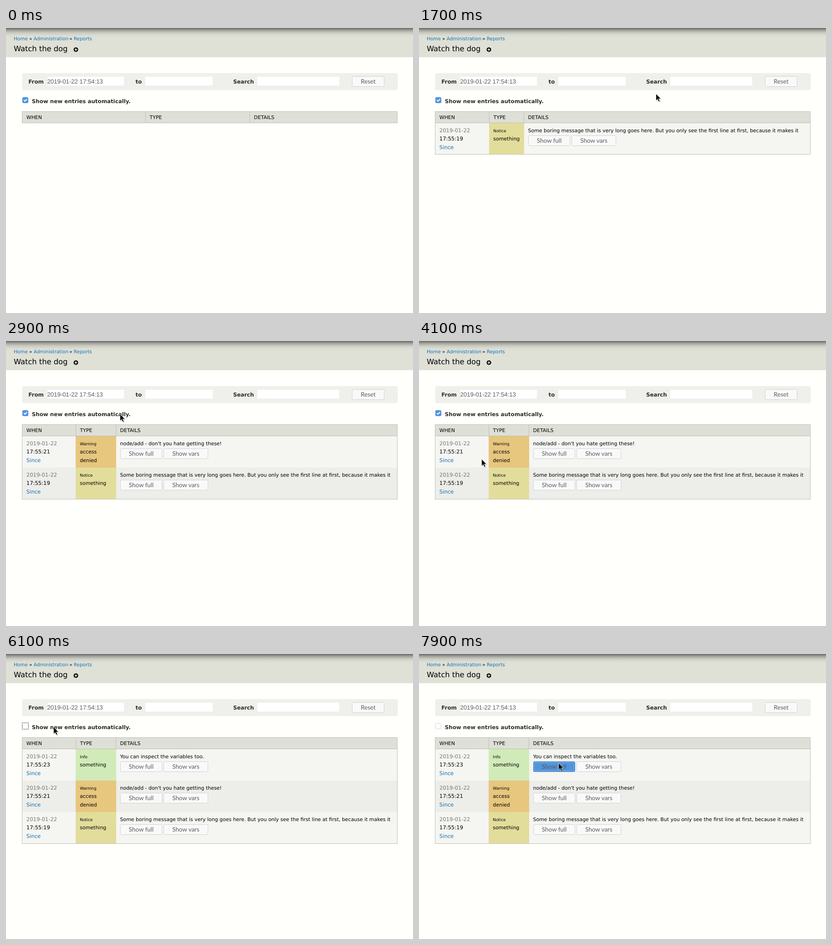
An HTML page for the animation above (8 s loop, 894 px wide and 626 px high).

```html
<!DOCTYPE html>
<html lang="en">
<head>
<meta charset="utf-8">
<title>Watch the dog</title>
<style>
  html, body { margin: 0; width: 100%; height: 100%; overflow: hidden; background: #fffffb; }
  svg { display: block; width: 894px; height: 626px; }
  text { font-family: "DejaVu Sans", sans-serif; font-size: 10.96px; text-rendering: geometricPrecision; white-space: pre; }
  .title { font-size: 16.3px; }
  .crumb { font-size: 10.45px; }
  .label { font-size: 11.83px; font-weight: bold; fill: #2b2b2b; }
  .input { font: 13.2px "Liberation Sans", sans-serif; fill: #595965; }
  .button { font: 13.4px Lato, sans-serif; fill: #5a5a66; text-anchor: middle; }
  .when { font-size: 11.6px; }
  .level { font-size: 8.8px; }
  .link { fill: #0f74b4; }
  .muted { fill: #777; }
</style>
</head>
<body>
<svg viewBox="0 0 894 626">
  <defs>
    <linearGradient id="shade" x2="0" y2="1">
      <stop offset="0" stop-opacity=".53"/>
      <stop offset=".25" stop-opacity=".28"/>
      <stop offset=".5" stop-opacity=".11"/>
      <stop offset=".75" stop-opacity=".03"/>
      <stop offset="1" stop-opacity="0"/>
    </linearGradient>
  </defs>
  <g id="page"></g>
  <g id="table"></g>
  <g id="checkbox"></g>
  <g id="pointer">
    <path d="M1.5 1v15.5l3.7-3.3 2.6 5.5 3-1.4-2.6-5.2h5z" opacity=".18"/>
    <path d="M.5-.5v15l3.4-3.2 2.5 5.4 2.6-1.2-2.5-5.2h4.7z" fill="#0a0a0a" stroke="#f4f4f4" stroke-width=".8"/>
  </g>
</svg>
<script>
const LOOP = 8000, STEP = 200, OFFSET = 100;
const UNCHECK_AT = 6100, PRESS_AT = 7900;
const LEFT = 35.5, RIGHT = 859.5, HEAD_TOP = 183.5, HEAD_BOTTOM = 208.5, ROW = 69.2;

const entries = [
  { at: 500, time: '17:55:19', level: 'Notice', color: '#e3dd9c', type: ['something'],
    text: 'Some boring message that is very long goes here. But you only see the first line at first, because it makes it' },
  { at: 2900, time: '17:55:21', level: 'Warning', color: '#e7c67e', type: ['access', 'denied'],
    text: "node/add - don't you hate getting these!" },
  { at: 4900, time: '17:55:23', level: 'Info', color: '#d1ebb8', type: ['something'],
    text: 'You can inspect the variables too.' }
];

// Separators before the type and details columns, by number of rows
const columns = [[306, 535], [154, 230], [153, 241], [153, 241]];

// Pointer path: time, x, y
const path = [
  [1100, 820, 64], [1300, 745, 88], [1700, 520, 145], [2100, 363, 177],
  [2300, 340, 176], [2700, 304, 171], [2900, 250, 161], [3100, 201, 180], [3300, 201, 180],
  [3500, 188, 215], [3700, 158, 270], [3900, 127, 287], [4100, 137, 260], [4500, 137, 215],
  [4900, 136, 161], [5700, 104, 161], [6300, 104, 161], [6500, 122, 168],
  [7100, 340, 247], [7300, 366, 254], [7500, 349, 254], [7700, 322, 246], [7900, 306, 240]
];

const byId = id => document.getElementById(id);
const text = (x, y, content, style = '') => `<text x="${x}" y="${y}" class="${style}">${content}</text>`;
const rect = (x, y, w, h, fill, extra = '') =>
  `<rect x="${x}" y="${y}" width="${w}" height="${h}" fill="${fill}" ${extra}/>`;
const line = (x1, y1, x2, y2) => `<path d="M${x1} ${y1}L${x2} ${y2}" stroke="#bebfb9"/>`;

function button(x, y, w, label, pressed) {
  const colors = pressed ? ['#5294da', '#4381c6'] : ['#f9faf8', '#cfd2da'];
  const focus = pressed
    ? rect(x + 2, y + 2, w - 4, 18, 'none', 'stroke="#a9c8e9" stroke-dasharray="1 1"') : '';
  return rect(x, y, w, 22, colors[0], `rx="2" stroke="${colors[1]}"`) + focus +
    text(x + w / 2, y + 15.6, label, 'button');
}

function drawPage() {
  byId('page').innerHTML =
    rect(0, 0, 894, 626, '#fffffb') + rect(0, 0, 894, 64, '#dfe0d6') + rect(0, 0, 894, 20, 'url(#shade)') +
    text(17, 27, 'Home', 'crumb link') + text(51, 27, '»', 'crumb') +
    text(60.7, 27, 'Administration', 'crumb link') + text(139.3, 27, '»', 'crumb') +
    text(148.7, 27, 'Reports', 'crumb link') +
    text(17, 51, 'Watch the dog', 'title') +
    '<circle cx="153.5" cy="47.5" r="5"/><path d="M150.5 47.5h6m-3-3v6" stroke="#fff" stroke-width="1.6"/>' +
    rect(35.5, 99, 825, 37.5, '#efefec', 'rx="4"') +
    rect(91, 107, 168, 19.5, '#fff') + rect(306, 107, 148, 19.5, '#fff') + rect(552, 107, 180, 19.5, '#fff') +
    text(49.3, 122, 'From', 'label') + text(284.5, 122, 'to', 'label') + text(499, 122, 'Search', 'label') +
    text(90.5, 122, '2019-01-22 17:54:13', 'input') +
    button(760.5, 106.5, 70, 'Reset') +
    text(56.7, 165.2, 'Show new entries automatically.', 'label');
}

const rowTop = index => Math.round(HEAD_BOTTOM + index * ROW);

function drawRow(entry, index, [typeX, detailsX], pressed) {
  const top = rowTop(index), height = rowTop(index + 1) - top;
  const y = HEAD_BOTTOM + index * ROW, base = Math.round(y + 20);
  const buttonTop = Math.round(y + 27.5) + .5;
  return rect(LEFT, top, RIGHT - LEFT, height, index % 2 ? '#ededea' : '#f5f5f2') +
    rect(typeX, top, detailsX + 1 - typeX, height, entry.color) +
    text(44.8, base, '2019-01-22', 'when muted') +
    text(44.8, base + 18.3, entry.time, 'when') +
    text(44.8, base + 36.5, 'Since', 'when link') +
    text(typeX + 9.3, base - .5, entry.level, 'level') +
    entry.type.map((word, i) => text(typeX + 9.3, base + 18.3 * (i + 1), word)).join('') +
    text(detailsX + 9.5, base, entry.text) +
    button(detailsX + 10.5, buttonTop, 91, 'Show full', pressed) +
    button(detailsX + 105.5, buttonTop, 97, 'Show vars');
}

function drawTable(t) {
  const rows = entries.filter(entry => t >= entry.at).reverse();
  const cols = columns[rows.length];
  const bottom = Math.round(HEAD_BOTTOM - .5 + rows.length * 69.3) + .5;
  byId('table').innerHTML =
    rect(LEFT, HEAD_TOP, RIGHT - LEFT, 25, '#dee0d8') +
    rows.map((entry, i) => drawRow(entry, i, cols, i === 0 && t >= PRESS_AT)).join('') +
    cols.map(x => line(x + .5, HEAD_TOP, x + .5, HEAD_BOTTOM)).join('') +
    line(LEFT, HEAD_BOTTOM, RIGHT, HEAD_BOTTOM) +
    rect(LEFT, HEAD_TOP, RIGHT - LEFT, bottom - HEAD_TOP, 'none', 'stroke="#bebfb9"') +
    text(44.8, 199.5, 'WHEN') + text(cols[0] + 9.5, 199.5, 'TYPE') + text(cols[1] + 9.6, 199.5, 'DETAILS');
}

function drawCheckbox(t) {
  const box = (fill, stroke) => rect(36.5, 152.5, 12, 12, fill, `rx="2" stroke="${stroke}"`);
  const focused = t >= UNCHECK_AT && t < PRESS_AT;
  byId('checkbox').innerHTML = t < UNCHECK_AT
    ? box('#5294da', '#4c8bd0') + '<path d="M39.2 158.3l2.5 2.6 4.6-4.9" fill="none" stroke="#fff" stroke-width="2"/>'
    : box('#fff', '#cbd0d8') +
      (focused ? rect(35.5, 150.5, 14, 15, 'none', 'stroke="#333" stroke-dasharray="1 1"') : '');
}

function drawPointer(t) {
  const next = path.findIndex(point => point[0] >= t);
  const pointer = byId('pointer');
  pointer.style.display = t < path[0][0] ? 'none' : '';
  const [t1, x1, y1] = path[next], [t0, x0, y0] = path[Math.max(next - 1, 0)];
  const k = t1 > t0 ? (t - t0) / (t1 - t0) : 1;
  pointer.setAttribute('transform', `translate(${Math.round(x0 + (x1 - x0) * k)} ${Math.round(y0 + (y1 - y0) * k)})`);
}

let shown;
function frame() {
  const now = performance.now() % LOOP;
  const t = Math.floor((now - OFFSET) / STEP) * STEP + OFFSET;
  if (t !== shown) {
    shown = t;
    drawTable(t);
    drawCheckbox(t);
    drawPointer(t);
  }
  requestAnimationFrame(frame);
}

drawPage();
frame();
</script>
</body>
</html>
```
